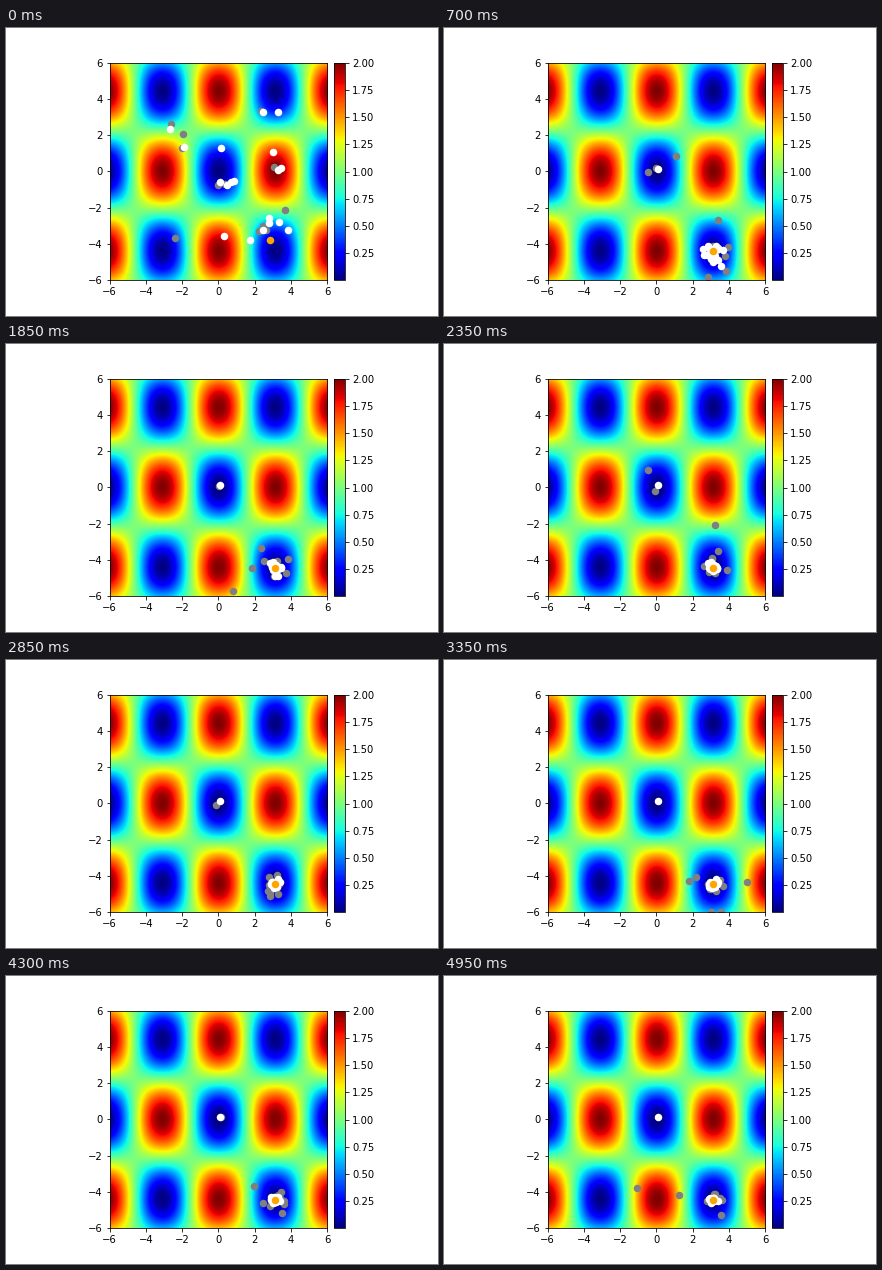
A matplotlib script for the animation above (5 s loop, 432 by 288 pixels).

```python
import numpy as np
import matplotlib.pyplot as plt
from matplotlib.animation import FuncAnimation
from mpl_toolkits.axes_grid1 import make_axes_locatable

FRAMES, INTERVAL = 100, 50
LIMIT = 6
FLIGHTS = 12  # cuckoos per step
HOLD = 20     # steps a settled nest stays in place

BASIN = np.array([3.14, -4.45])
FIRST_BEST = np.array([2.87, -3.80])
STRAY = np.array([0.10, 0.12])  # the one nest outside the basin
START_CENTRES = [(-2.9, 2.6), (3.5, 3.4), (0.6, -0.4),
                 (3.0, 0.3), (2.9, -3.1), (1.7, -4.1)]
START_COUNTS = [2, 2, 5, 3, 5, 2]


def griewank(x, y):
    return 1 + (x**2 + y**2) / 4000 - np.cos(x) * np.cos(y / np.sqrt(2))


starts = np.repeat(START_CENTRES, START_COUNTS, axis=0)
starts += np.random.default_rng(3).normal(0, 0.5, starts.shape)
# The worse a nest is, the sooner it is abandoned.
leave = np.round(12 - 5.5 * griewank(*starts.T)).clip(1, 12).astype(int)
stray = len(starts) // 3


def best_at(step):
    return BASIN + (FIRST_BEST - BASIN) * 0.4 ** (step // 4)


def nest_at(i, step):
    if step < leave[i]:
        return starts[i]
    if i == stray:
        return STRAY
    # Rebuild ever closer to the best nest, each in its own turn.
    built = max(leave[i], step - (step + 7 * i) % HOLD)
    spread = 0.12 + 0.5 * np.exp(-built / 16)
    rng = np.random.default_rng([i, built])
    return best_at(step) + spread * rng.normal(0, 0.9, 2)


def nests_at(step):
    return np.array([nest_at(i, step) for i in range(len(starts))])


def flights_at(step):
    rng = np.random.default_rng(step)
    origin = rng.choice(nests_at(step), FLIGHTS)
    # Levy steps by Mantegna's rule
    u = rng.normal(0, 0.6966, origin.shape)
    v = rng.normal(0, 1, origin.shape)
    levy = u / np.abs(v) ** (1 / 1.5)
    return (origin + 0.35 * levy).clip(-LIMIT, LIMIT)


fig, ax = plt.subplots(figsize=(6, 4), dpi=72, facecolor="white")
fig.subplots_adjust(left=0.125, right=0.9, bottom=0.125, top=0.88)

axis = np.linspace(-LIMIT, LIMIT, 100)
image = ax.imshow(griewank(*np.meshgrid(axis, axis)), cmap="jet",
                  origin="lower", interpolation="bilinear",
                  extent=(-LIMIT, LIMIT, -LIMIT, LIMIT))
ticks = range(-LIMIT, LIMIT + 1, 2)
ax.set(xticks=ticks, yticks=ticks)
cax = make_axes_locatable(ax).append_axes("right", size="5%", pad=0.1)
fig.colorbar(image, cax=cax, ticks=np.arange(0.25, 2.01, 0.25))


def dots(color, layer):
    return ax.scatter([], [], s=36, color=color, linewidth=1.5, zorder=layer)


flights, nests, best = dots("gray", 2), dots("white", 3), dots("orange", 4)
ax.set(xlim=(-LIMIT, LIMIT), ylim=(-LIMIT, LIMIT))


def draw(step):
    flights.set_offsets(flights_at(step))
    nests.set_offsets(nests_at(step))
    best.set_offsets([best_at(step)])
    return flights, nests, best


anim = FuncAnimation(fig, draw, frames=FRAMES, interval=INTERVAL,
                     repeat=True, repeat_delay=0)
plt.show()
```
